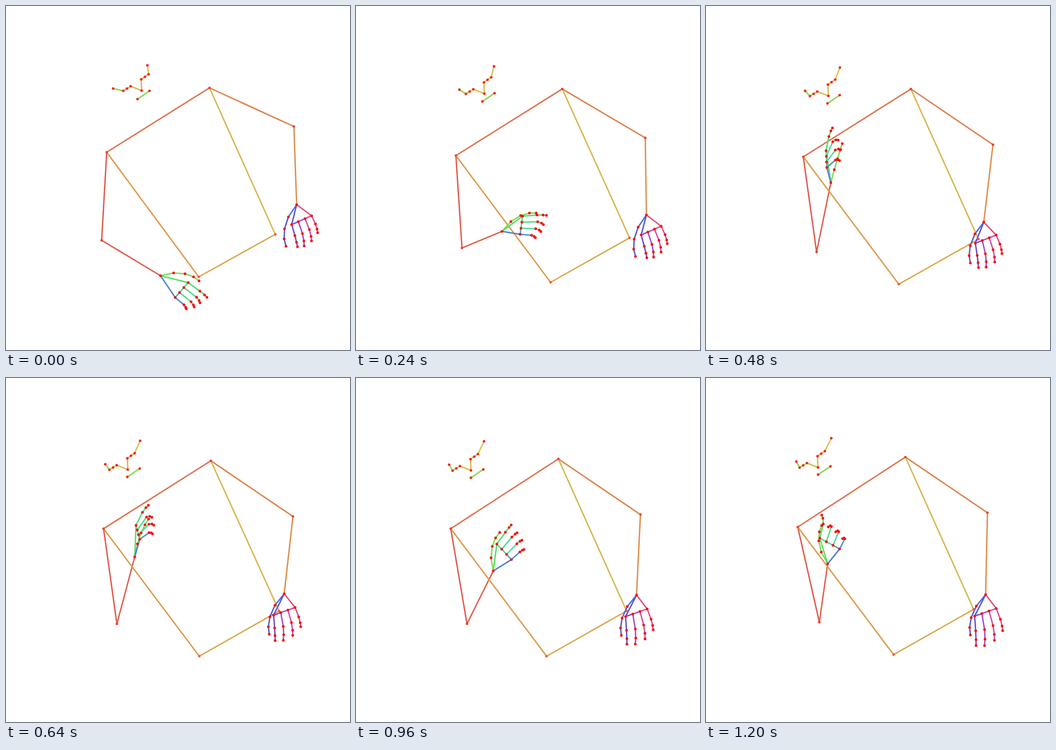
These frames come from a looping animation (748 px wide and 748 px high, 1.28 s). An HTML page:

```html
<!DOCTYPE html>
<html lang="en">
<head>
<meta charset="utf-8">
<title>Skeleton</title>
<style>
  html, body { margin: 0; width: 100%; height: 100%; overflow: hidden; background: #fff; }
  svg { display: block; width: 100vw; height: 100vh; }
</style>
</head>
<body>
<svg viewBox="0 0 748 748"><g id="bones" stroke-width="3"></g><g id="joints"></g></svg>
<script>
const STEP = 80, STEPS = 16, END = 1200;
const times = [0, 160, 320, 480, 800, 960, END];
const FINGERS = ['index', 'middle', 'ring', 'pinky'];
const P = {};   // joint positions at the current time
const bones = [], joints = [];

// Motion helpers
const mix = (a, b, k) => a.map((v, i) => v + (b[i] - v) * k);
const add = (a, b) => [a[0] + b[0], a[1] + b[1]];
const polar = (deg, r) => [r * Math.cos(deg * Math.PI / 180), r * Math.sin(deg * Math.PI / 180)];
const settle = (t, tau) => 1 - Math.exp(-t / tau);
const smooth = (t, from, to) => {
  const u = Math.min(1, Math.max(0, (t - from) / (to - from)));
  return u * u * (3 - 2 * u);
};

// Smooth curve through key values
function sample(keys, t) {
  const last = keys.length - 1;
  let i = 0;
  while (i < last - 1 && t >= times[i + 1]) i++;
  const span = times[i + 1] - times[i], u = (t - times[i]) / span, v = 1 - u;
  const slope = (k, c) => {
    const a = Math.max(k - 1, 0), b = Math.min(k + 1, last);
    return (keys[b][c] - keys[a][c]) / (times[b] - times[a]) * span;
  };
  return keys[i].map((p, c) =>
    p * v * v * (1 + 2 * u) + keys[i + 1][c] * u * u * (3 - 2 * u) +
    slope(i, c) * u * v * v - slope(i + 1, c) * u * u * v);
}

// Key points of the leading joints
const paths = {
  shoulderR: [[219, 318], [217.5, 324], [216.5, 326], [211.5, 328], [212.5, 327], [206, 327.5], [199.5, 324]],
  shoulderL: [[442.5, 178], [447.5, 180.5], [448.5, 180], [445.5, 180.5], [445, 179], [440, 176], [433.5, 172]],
  nose: [[295, 184], [287, 188.5], [271.5, 192.5], [266, 195.5], [262.5, 202], [250, 201], [243.5, 194.5]],
  wristR: [[336, 586.5], [341.5, 553.5], [290, 425.5], [271.5, 384], [292.5, 403.5], [298.5, 419.5], [264.5, 404]],
  wristL: [[632, 432], [641.5, 446.5], [618.5, 461.5], [604, 470], [608.5, 467.5], [610, 472], [608, 471]]
};

// Hand pose: index knuckle angle and distance, pinky knuckle angle and distance,
// finger aim, spread, curl, thumb angle, thumb bend
const wave = [
  [14, 62, 56, 57, 36, 4, 15, -12, 16],
  [2, 58.5, 48, 54, 29, 2, 12, -21, 16],
  [-76, 55.5, -37, 27.5, -42, 19, 30, -73, 14],
  [-98.5, 70, -105, 34, -79, 38, 35, -75, 1],
  [-74.5, 64, -32, 44.5, -44, 14, 40, -84, 15],
  [-82.5, 59, -32, 46.5, -54, 12, 8, -99.5, 15.5],
  [-107, 58.5, -51, 41.5, -76, 13, -70, -118.5, 16]
];
const restStart = [104, 44.5, 36.5, 40.5, 74, -9, 8, 124, -16];
const restEnd = [117, 52.5, 52.5, 38, 86, -17, 7, 129, -15];

const hands = {
  R: { pose: t => sample(wave, t), size: () => 31.5, thumb: 29, second: .42, third: .23, taper: .65 },
  L: {
    pose: t => mix(restStart, restEnd, smooth(t, 160, 720)),
    size: t => 25 + 7 * (t / END) ** 1.5,
    thumb: 32, second: .6, third: .4, taper: 1
  }
};

function poseBody(t) {
  for (const name in paths) P[name] = sample(paths[name], t);
  const lean = settle(t, 200), drop = smooth(t, 0, 420), late = smooth(t, 800, END);
  P.hipR = add(P.shoulderR, mix([200, 271], [208.5, 277.5], lean));
  P.hipL = add(P.shoulderR, mix([366.5, 178.5], [382.5, 179], lean));
  P.elbowL = add(P.shoulderL, mix([183.5, 84], [178.5, 121], drop));
  P.elbowR = add(P.shoulderR, mix([-11, 191.5], [29 + 18 * late, 207], drop));
}

function poseFace(t) {
  const turn = settle(t, 350);
  const place = (name, offset) => { P[name] = add(P.nose, offset); };
  [1, 2, 3].forEach(n => {
    place('eyeR' + n, mix([-24, -9.5], [-40, .5], (n - 1) / 2));
    place('eyeL' + n, mix([-1, -24.5], [15, -35.5], (n - 1) / 2));
  });
  place('earR', mix([-62, -4.5], [-46.5, -13], turn));
  place('earL', mix([12.5, -55], [29.5, -64], turn));
  place('mouthR', mix([-9, 18.5], [.5, 15.5], turn));
  place('mouthL', mix([17, .5], [27.5, -2.5], turn));
}

function poseHand(side, t) {
  const hand = hands[side], wrist = P['wrist' + side];
  const [indexAt, indexFar, pinkyAt, pinkyFar, aim, spread, curl, thumbAt, bend] = hand.pose(t);

  let tip = wrist;
  [1, .86, .68, .51].forEach((part, j) => {
    tip = add(tip, polar(thumbAt + bend * j, hand.thumb * part));
    P['thumb' + side + (j + 1)] = tip;
  });

  FINGERS.forEach((id, i) => {
    const across = i / 3;
    const size = hand.size(t) * [1, 1.1, 1.02, .79][i];
    const fold = i ? curl : curl / 4;
    const reach = size * (i ? hand.taper : 1);
    const lengths = [size, reach * hand.second * Math.cos(fold * Math.PI / 180), reach * hand.third];
    let p = add(wrist, mix(polar(indexAt, indexFar), polar(pinkyAt, pinkyFar), across));
    P[id + side + 1] = p;
    lengths.forEach((length, j) => {
      p = add(p, polar(aim + spread * across + fold * j, length));
      P[id + side + (j + 2)] = p;
    });
  });
}

// Drawing
const svgEl = (tag, parent, attrs) => {
  const el = document.createElementNS('http://www.w3.org/2000/svg', tag);
  for (const k in attrs) el.setAttribute(k, attrs[k]);
  return document.getElementById(parent).appendChild(el);
};
const bone = (a, b, stroke) => bones.push({ a, b, el: svgEl('line', 'bones', { stroke }) });
const chain = (names, colors) => colors.forEach((c, i) => bone(names[i], names[i + 1], c));
const dots = (names, fill, r) =>
  names.forEach(name => joints.push({ name, el: svgEl('circle', 'joints', { fill, r }) }));
const numbered = id => [1, 2, 3, 4].map(n => id + n);

chain(['shoulderR', 'elbowR', 'wristR'], ['#de5b4d', '#de604d']);
chain(['shoulderR', 'shoulderL', 'elbowL', 'wristL'], ['#de734f', '#de824e', '#de8f4e']);
chain(['shoulderR', 'hipR', 'hipL'], ['#de9b4d', '#dba84d']);
bone('shoulderL', 'hipL', '#d8b54f');
chain(['nose', 'eyeL1', 'eyeL2', 'eyeL3', 'earL'], ['#d9b84e', '#d6bc4e', '#d6c24e', '#d5c54e']);
chain(['nose', 'eyeR1', 'eyeR2', 'eyeR3', 'earR'], ['#d6bf4e', '#c8ca4e', '#a8d24e', '#8cd850']);
bone('mouthR', 'mouthL', '#84d950');
dots(['shoulderR', 'shoulderL', 'elbowR', 'elbowL'], '#f23c30', 2.7);
dots(['hipR', 'hipL'], '#ee5a3a', 2.7);
dots(['nose', 'eyeR1', 'eyeR2', 'eyeR3', 'earR', 'eyeL1', 'eyeL2', 'eyeL3', 'earL', 'mouthR', 'mouthL'], '#fb241a', 2.8);

function drawHand(side, palm, fingers) {
  const wrist = 'wrist' + side;
  const knuckles = FINGERS.map(id => id + side + 1);
  bone(wrist, 'thumb' + side + 1, palm[0]);
  chain([wrist, ...knuckles, wrist], palm.slice(1));
  ['thumb', ...FINGERS].forEach((id, i) => {
    const names = numbered(id + side);
    chain(names, Array(3).fill(fingers[i]));
    dots(names, '#fc0d0d', 2.9);
  });
  dots([wrist], '#f81414', 2.9);
}
drawHand('R', ['#82dc54', '#58de68', '#50dc82', '#50d2a0', '#50a4c6', '#4f80d2'],
  ['#78dc56', '#50dc74', '#50dc8c', '#50daa2', '#5090d0']);
drawHand('L', ['#4f6cd8', '#5c54d8', '#8650d0', '#b050c6', '#d250a4', '#e05078'],
  ['#505ed8', '#6650d4', '#a050cc', '#ca50b4', '#dc5090']);

function setAttrs(el, attrs) {
  for (const k in attrs) el.setAttribute(k, attrs[k].toFixed(2));
}

function draw(t) {
  poseBody(t);
  poseFace(t);
  poseHand('R', t);
  poseHand('L', t);
  bones.forEach(({ a, b, el }) => setAttrs(el, { x1: P[a][0], y1: P[a][1], x2: P[b][0], y2: P[b][1] }));
  joints.forEach(({ name, el }) => setAttrs(el, { cx: P[name][0], cy: P[name][1] }));
}

const start = performance.now();
function tick() {
  const elapsed = Math.max(0, performance.now() - start);
  draw(Math.floor(elapsed / STEP) % STEPS * STEP);
  requestAnimationFrame(tick);
}
tick();
</script>
</body>
</html>
```
